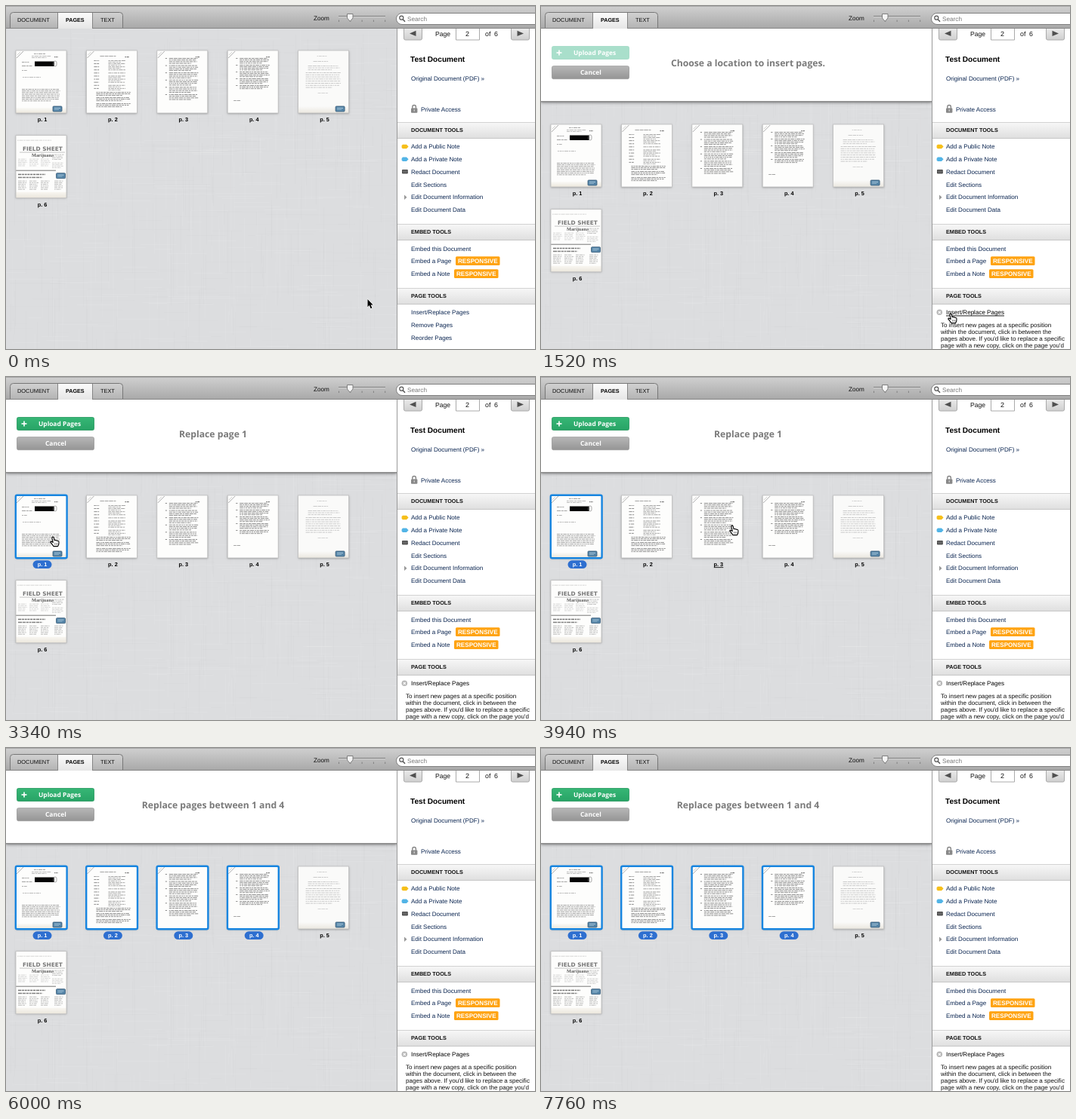
Recreate the animation shown at these times as an HTML page with a canvas. Size 700x455 px, loop 7780 ms.

```html
<!DOCTYPE html>
<html lang="en">
<head>
<meta charset="utf-8">
<title>Replace pages</title>
<style>
html, body { margin: 0; width: 100%; height: 100%; overflow: hidden; background: #dcdddf; }
canvas { display: block; }
</style>
</head>
<body>
<canvas id="stage" width="700" height="455"></canvas>
<script>
const LOOP = 7780, OPEN = 1200, PICK = 3220, RANGE = 4580, HIDE = 5640;
const SANS = '"Liberation Sans", Arial, sans-serif';
const HUMAN = '"Open Sans", "Noto Sans", sans-serif';
const LINK = '#08234f';
const canvas = document.getElementById('stage');
const g = canvas.getContext('2d');
g.textRendering = 'geometricPrecision';

let seed = 1;
const rnd = () => (seed = seed * 16807 % 2147483647) / 2147483647;

function rect(x, y, w, h, fill) { g.fillStyle = fill; g.fillRect(x, y, w, h); }

function grad(y, h, ...stops) {
  const s = g.createLinearGradient(0, y, 0, y + h);
  stops.forEach((c, i) => s.addColorStop(i / (stops.length - 1), c));
  return s;
}

function box(x, y, w, h, r, fill, stroke, line = 1) {
  g.beginPath();
  g.roundRect(x, y, w, h, r);
  if (fill) { g.fillStyle = fill; g.fill(); }
  if (stroke) { g.strokeStyle = stroke; g.lineWidth = line; g.stroke(); }
}

function poly(points, fill, stroke, line = 1) {
  g.beginPath();
  points.forEach(([x, y]) => g.lineTo(x, y));
  g.closePath();
  if (fill) { g.fillStyle = fill; g.fill(); }
  if (stroke) { g.strokeStyle = stroke; g.lineWidth = line; g.stroke(); }
}

function stroke(d, color, line = 1) {
  g.strokeStyle = color;
  g.lineWidth = line;
  g.stroke(new Path2D(d));
}

function text(s, x, y, size, color = LINK, { bold, align = 'left', family = SANS } = {}) {
  g.font = `${bold ? 'bold ' : ''}${size}px ${family}`;
  g.textAlign = align;
  g.fillStyle = color;
  g.fillText(s, x, y);
}

// Faint woven backdrop
const linen = document.createElement('canvas');
linen.width = 517;
linen.height = 425;
{
  const c = linen.getContext('2d');
  c.fillStyle = '#dcdddf';
  c.fillRect(0, 0, 517, 425);
  for (let i = 0; i < 900; i++) {
    const len = 15 + rnd() * 70, across = i % 2;
    c.fillStyle = rnd() < .5 ? 'rgba(255,255,255,.08)' : 'rgba(110,115,125,.025)';
    c.fillRect(Math.floor(rnd() * 517), Math.floor(rnd() * 425), across ? len : 1, across ? 1 : len);
  }
}

// Lines of unreadable words
function words(x, y, w, rows, color, step = 2.1, h = .9) {
  for (let r = 0; r < rows; r++) {
    const end = x + w - (r === rows - 1 ? w * .25 : rnd() * 3);
    for (let p = x; p < end;) {
      const len = Math.min(1.5 + rnd() * 4, end - p);
      rect(p, y + r * step, len, h, color);
      p += len + .8;
    }
  }
}

function blueTag(x, y) {
  box(x, y, 12, 7, 1, '#5585a8', '#3a5c78', .8);
  rect(x + 2, y + 2, 8, 1, '#a9c6da');
  rect(x + 2, y + 4, 6, 1, '#8fb2c9');
}

function cornerMark() {
  stroke('M1 10 L10 1', '#999', .8);
  stroke('M2 6 L6 2', '#bbb', .7);
  words(51, 8, 7, 1, '#777', 2, 1.2);
}

const INK = '#999', DARK = '#828282';
const sheets = [
  () => {
    cornerMark();
    words(24, 4, 20, 1, INK);
    words(21, 7, 26, 2, '#b4b4b4');
    words(8, 15, 13, 1, INK);
    words(8, 20, 18, 1, INK);
    words(8, 26, 10, 1, '#aaa');
    rect(25, 14.5, 26, 6.5, '#050505');
    box(50, 14, 4, 7, 2, null, '#999', .8);
    words(9, 35, 32, 1, '#b4b4b4');
    words(8, 51, 51, 8, INK, 2.2);
    rect(0, 76, 67, 7, grad(76, 7, '#fafaf7', '#ece7dc'));
    blueTag(49, 74);
  },
  () => {
    cornerMark();
    words(18, 7, 28, 1, INK);
    for (let y = 13; y < 52; y += 4.1) {
      words(10, y, 9, 1, DARK);
      words(29, y, 30, 1, INK);
      if (rnd() < .6) words(29, y + 2, 22, 1, '#aaa');
    }
    for (const y of [55, 62, 70]) words(13, y, 46, 3, DARK);
  },
  () => {
    cornerMark();
    for (let y = 10; y < 66; y += 9.6) {
      words(11, y, 3, 1, DARK);
      words(16, y, 39, 4, DARK, 2.2);
    }
  },
  () => {
    cornerMark();
    for (const y of [10, 19, 28, 37, 46]) {
      words(11, y, 3, 1, DARK);
      words(16, y, 40, y === 46 ? 3 : 4, DARK, 2.1);
    }
    words(8, 66, 12, 1, INK);
  },
  () => {
    rect(0, 0, 67, 83, '#fafaf9');
    rect(0, 74, 67, 9, grad(74, 9, '#fafaf9', '#ebe7df'));
    words(25, 7, 17, 1, '#ccc');
    words(20, 14, 27, 1, '#c4c4c4');
    words(13, 20, 42, 3, '#c6c6c6', 2.6);
    words(10, 29, 47, 8, '#c3c3c3', 2.8);
    words(26, 56, 18, 1, '#d2d2d2');
    blueTag(49.5, 74);
  },
  () => {
    words(2, 6, 60, 1, '#d0d0d0');
    text('FIELD SHEET', 9, 20, 7.4, '#777', { bold: true, family: '"DejaVu Sans", sans-serif' });
    rect(5, 22, 60, .7, '#aaa');
    text('Marijuana', 21, 28.3, 6.3, '#555', { bold: true, family: '"Liberation Serif", serif' });
    for (const x of [3, 18, 33]) words(x, 31, 13, 5, '#d0d0d0', 2.2);
    words(48, 25, 16, 4, '#bbb');
    words(48, 36, 16, 4, '#ccc');
    rect(0, 46, 53, 1, '#777');
    words(3, 51, 48, 1, '#777', 2, 1.5);
    words(3, 55, 43, 1, '#808080', 2, 1.5);
    for (const x of [3, 18, 33, 51]) words(x, 60, 12, 6, '#b4b4b4', 2.2);
    rect(0, 75, 67, 8, grad(75, 8, '#f8f6f1', '#ebe6dc'));
    blueTag(53.5, 50);
  }
];

const pageX = i => 13 + (i % 5) * 93.4;

function page(i, top, selected, hovered) {
  const x = pageX(i), y = top + (i > 4 ? 112.7 : 0), mid = x + 35;
  g.save();
  g.shadowColor = 'rgba(0,0,0,.3)';
  g.shadowBlur = 2.5;
  g.shadowOffsetY = .7;
  rect(x, y, 67, 83, '#fdfdfc');
  g.restore();
  g.save();
  g.translate(x, y);
  g.beginPath();
  g.rect(0, 0, 67, 83);
  g.clip();
  seed = 77 + i * 991;
  sheets[i]();
  g.restore();
  if (selected) {
    box(x - .2, y - .2, 67.8, 83.4, 2, null, '#1785e0', 2.4);
    box(mid - 12.5, y + 86.3, 25, 10.8, 5.4, '#2e6fd0');
  } else {
    g.strokeStyle = '#bebebe';
    g.lineWidth = .8;
    g.strokeRect(x, y, 67, 83);
  }
  text('p. ' + (i + 1), mid, y + 94, 7.3, selected ? '#fff' : '#000', { bold: true, align: 'center' });
  if (hovered && !selected) rect(mid - 6, y + 95.2, 12.5, .9, '#111');
}

function button(label, x, y, fill, edge) {
  box(14.5, y, 102, 17, 2, fill, edge, .8);
  text(label, x, y + 11.4, 8.4, '#fff', { bold: true, family: HUMAN });
}

function panel(title, active) {
  g.save();
  g.shadowColor = 'rgba(0,0,0,.5)';
  g.shadowBlur = 4;
  g.shadowOffsetY = 1;
  rect(0, 30, 517, 97, '#fff');
  g.restore();
  rect(0, 126, 517, 1.5, '#8e8e8e');
  if (active) button('Upload Pages', 43, 53.5, grad(54, 17, '#36b675', '#27a365'), '#22965b');
  else button('Upload Pages', 43, 53.5, '#a9dfcb', '#a0d8c3');
  rect(20.5, 61.2, 7, 1.6, '#fff');
  rect(23.2, 58.5, 1.6, 7, '#fff');
  button('Cancel', 52, 79.7, grad(80, 17, '#b6b6b6', '#949494'), '#989898');
  text(title, 274, 80, 12.2, '#7a7a7a', { bold: true, align: 'center', family: HUMAN });
}

function heading(label, y) {
  rect(518, y - 10.5, 182, 21, grad(y - 10.5, 21, '#f7f7f7', '#dfdfdf'));
  rect(518, y - 11, 182, 1, '#d2d2d2');
  rect(518, y + 10, 182, 1, '#c6c6c6');
  text(label, 536, y + 2.3, 7.25, '#111', { bold: true });
}

function tag(y, fill) {
  poly([[525, y - 2.7], [530, y - 2.7], [532.6, y], [530, y + 2.7], [525, y + 2.7], [523.6, y + 1.4], [523.6, y - 1.4]], fill);
}

function badge(x, y) {
  box(x, y, 58.5, 11.8, 1.5, '#ffa311');
  text('RESPONSIVE', x + 3, y + 8.8, 8.1, '#fff', { bold: true });
}

function arrowButton(x, dir) {
  box(x + .5, 24.5, 24, 20.5, 2, grad(25, 20, '#f2f2f2', '#cfcfcf'), '#aaa');
  const m = x + 12.5;
  poly([[m - 4 * dir, 32.7], [m + 4.5 * dir, 36.4], [m - 4 * dir, 40.1]], '#505050');
}

function sidebar(opened, linkHover) {
  rect(517, 30, 183, 425, '#fff');
  rect(517, 30, 1, 425, '#999');
  arrowButton(526, -1);
  arrowButton(668, 1);
  text('Page', 568, 39.5, 8.6, '#111');
  box(595.5, 27.5, 31, 17.5, 0, '#fff', '#aaa');
  text('2', 608, 40, 9, '#111');
  text('of', 634, 39.5, 8.8, '#111');
  text('6', 646, 39.5, 8.8, '#111');
  text('Test Document', 535, 74.2, 10.1, '#000', { bold: true });
  text('Original Document (PDF) »', 536, 98.8, 8.05);
  stroke('M537.8 136 V133.8 A2.3 2.3 0 0 1 542.4 133.8 V136', '#888', 1.4);
  box(536, 135.5, 8.4, 6.3, 1, '#888');
  rect(539.6, 137.3, 1.2, 2.4, '#ddd');
  text('Private Access', 549, 140, 8.05);

  heading('DOCUMENT TOOLS', 165);
  ['Add a Public Note', 'Add a Private Note', 'Redact Document', 'Edit Sections',
    'Edit Document Information', 'Edit Document Data'].forEach((s, i) => text(s, 536, 189.2 + i * 16.8, 8.05));
  tag(186.5, '#f6bf1a');
  tag(203.3, '#52b4e6');
  box(524.5, 217.5, 6.8, 4.5, 0, '#666', '#333', .8);
  poly([[527, 250.5], [530.5, 253.7], [527, 257]], '#999');

  heading('EMBED TOOLS', 300);
  ['Embed this Document', 'Embed a Page', 'Embed a Note'].forEach((s, i) => text(s, 536, 324.5 + i * 16.8, 8.05));
  badge(595, 332.3);
  badge(593, 349.2);

  heading('PAGE TOOLS', 385);
  text('Insert/Replace Pages', 536, 409.3, 8.05, opened ? '#000' : LINK);
  if (linkHover) rect(536, 410.5, 77, .9, opened ? '#000' : LINK);
  if (opened) {
    box(523.5, 402.5, 7.6, 7.6, 3.8, '#b9b9b9');
    stroke('M525.8 404.8 l3 3 m0 -3 l-3 3', '#fff', 1.1);
    ['To insert new pages at a specific position', 'within the document, click in between the',
      'pages above. If you\'d like to replace a specific', 'page with a new copy, click on the page you\'d'
    ].forEach((s, i) => text(s, 529, 425.5 + i * 9, 8.05, '#111'));
  } else {
    text('Remove Pages', 536, 426, 8.05);
    text('Reorder Pages', 536, 442.8, 8.05);
  }
}

function toolbar() {
  rect(0, 0, 700, 30, grad(0, 30, '#d0d0d0', '#bcbcbc', '#a8a8a8'));
  rect(0, 0, 700, 1, '#a8a8a8');
  g.save();
  g.beginPath();
  g.rect(0, 0, 700, 30);
  g.clip();
  box(5.5, 8.5, 149, 24, [4, 4, 0, 0], grad(8, 21, '#d2d2d2', '#b4b4b4'), '#777');
  g.restore();
  rect(0, 29, 700, 1, '#868686');
  rect(69, 9, 45, 21, grad(9, 21, '#fbfbfb', '#e6e6e6'));
  rect(68, 9, 1, 20, '#858585');
  rect(114, 9, 1, 20, '#858585');
  text('DOCUMENT', 15, 21.2, 7.4, '#111');
  text('PAGES', 79, 21.2, 7.2, '#000', { bold: true });
  text('TEXT', 125, 21.2, 7.4, '#111');
  text('Zoom', 407, 19, 8.2, '#111');
  rect(440, 13, 62, 1.2, '#808080');
  rect(440, 14.2, 62, .8, '#ddd');
  for (let i = 0; i < 5; i++) rect(440 + i * 15.3, 18.5, 1, 2.5, '#808080');
  poly([[451.5, 10.5], [459, 10.5], [459, 16], [455.2, 20.3], [451.5, 16]], '#f4f4f4', '#777', .9);
  box(516.5, 9.5, 200, 15, 7.5, '#fff', '#808080');
  box(520.8, 13.2, 5, 5, 2.5, null, '#555', 1.2);
  stroke('M525.2 17.8 L528 20.8', '#555', 1.5);
  text('Search', 531, 19.6, 8.2, '#777');
}

const path = [
  [0, 478.5, 389], [350, 478.5, 389], [1000, 542, 408], [1700, 542, 408],
  [2550, 79, 218], [2950, 79, 218], [3130, 62, 212], [3340, 62, 212],
  [3900, 253, 197], [4060, 253, 197], [4460, 355, 194], [LOOP, 355, 194]
];

function pointer(t) {
  const i = path.findIndex(p => p[0] > t);
  const [t0, x0, y0] = path[i - 1], [t1, x1, y1] = path[i];
  const u = (t - t0) / (t1 - t0), e = u * u * (3 - 2 * u);
  return [x0 + (x1 - x0) * e, y0 + (y1 - y0) * e];
}

const arrowShape = new Path2D('M0 0 V10.2 L2.3 8.1 L4.1 12.2 L5.9 11.4 L4.1 7.4 H7.2 Z');
const handShape = new Path2D('M-1.2 1 Q0 -.8 1.2 1 L2 4.6 Q3.2 3.8 4 5 Q5.4 4.2 6 5.6 Q7.8 5 8 7 L7.8 10 L6.6 12.6 H1 L-1.4 9.4 L-3.2 7.2 Q-3 5.4 -1.2 6.6 L.2 7.4 Z');

function cursor(x, y, hand) {
  g.save();
  g.translate(x, y);
  g.lineJoin = 'round';
  g.lineWidth = 1.1;
  g.fillStyle = hand ? '#fff' : '#000';
  g.strokeStyle = hand ? '#000' : '#fff';
  const shape = hand ? handShape : arrowShape;
  if (!hand) g.stroke(shape);
  g.fill(shape);
  if (hand) {
    g.stroke(shape);
    stroke('M2.6 8.3 v2.4 m1.7 -2.4 v2.4 m1.7 -2.4 v2.4', '#333', .6);
  }
  g.restore();
}

function draw(t) {
  const opened = t >= OPEN, top = opened ? 157 : 59;
  const last = t >= RANGE ? 4 : t >= PICK ? 1 : 0;
  const [x, y] = pointer(t);
  const onLink = x >= 536 && x <= 613 && y >= 401 && y <= 412;
  const inRow = opened && x > 13 && x < 470 && y > top && y < top + 86;
  const column = Math.floor((x - 13) / 93.4), inset = x - pageX(column);
  const onGap = inRow && inset > 60;
  const hovered = inRow && inset <= 67 && !(onGap && !last) ? column : -1;

  g.drawImage(linen, 0, 30);
  if (opened) {
    panel(last === 4 ? 'Replace pages between 1 and 4' : last ? 'Replace page 1'
      : 'Choose a location to insert pages.', last > 0);
  }
  for (let i = 0; i < 6; i++) page(i, top, i < last, i === hovered);
  if (onGap && !last) {
    const m = pageX(column) + 81.5;
    poly([[m - 2.5, 152], [m + 2.5, 152], [m, 155]], '#777');
    g.setLineDash([3, 2]);
    stroke(`M${m} 155 V243`, '#777');
    g.setLineDash([]);
  }
  sidebar(opened, onLink);
  toolbar();
  if (t < HIDE) cursor(x, y, onLink || inRow);
}

const start = performance.now();
function tick() {
  draw((performance.now() - start) % LOOP);
  requestAnimationFrame(tick);
}
tick();
</script>
</body>
</html>
```
